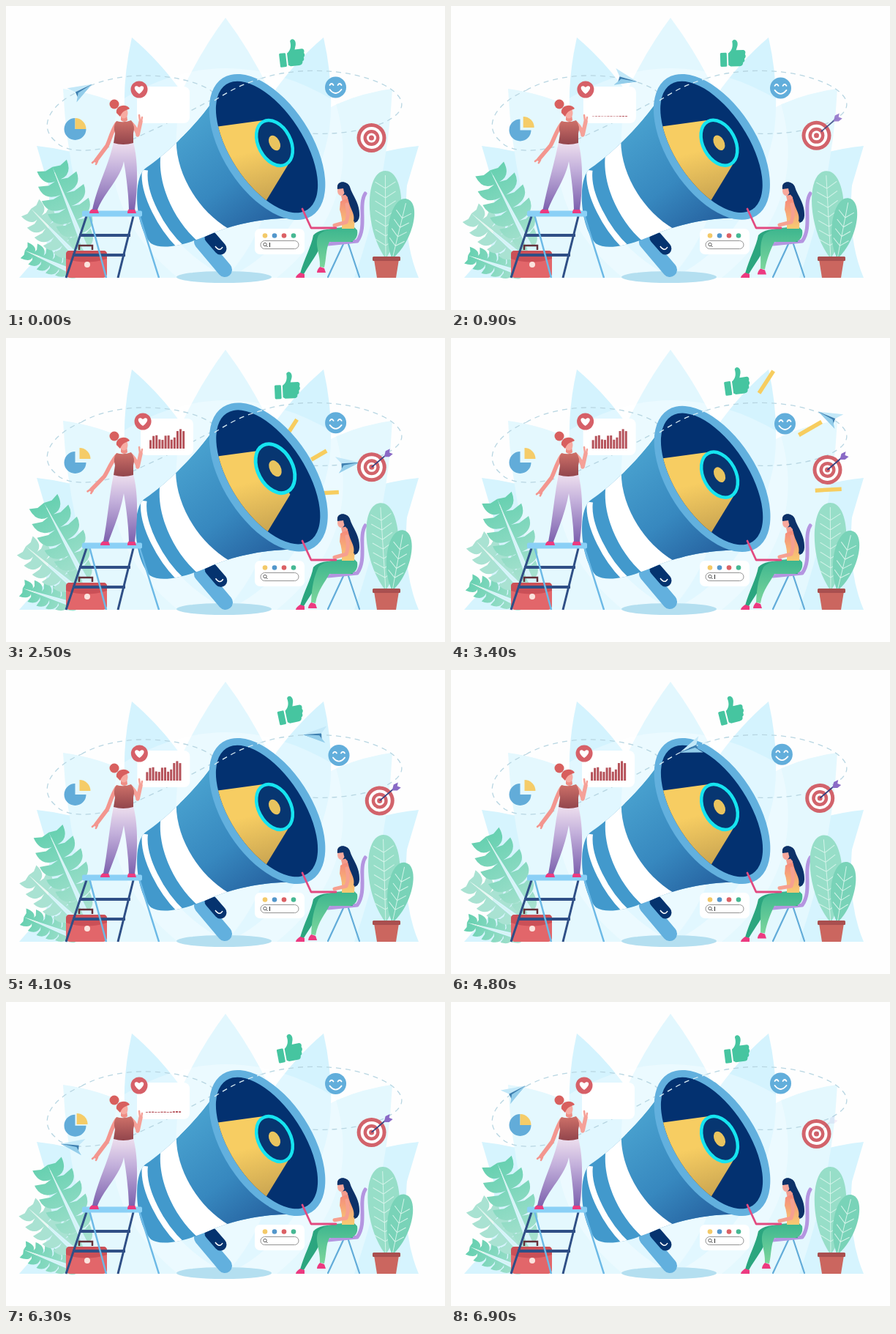
These frames come from a looping animation (600x415 px, 7 s). An HTML page:

```html
<!DOCTYPE html>
<html lang="en">
<head>
<meta charset="utf-8">
<title>Megaphone campaign</title>
<style>
html,body{margin:0;width:100%;height:100%;overflow:hidden;background:#fefefe}
svg{display:block;width:100vw;height:100vh}
</style>
</head>
<body>
<svg viewBox="0 0 600 415" xmlns="http://www.w3.org/2000/svg">
<defs>
  <linearGradient id="cone" x1="0" y1="0" x2=".75" y2="1"><stop offset=".15" stop-color="#4aa3d0"/><stop offset=".6" stop-color="#3788bf"/><stop offset="1" stop-color="#235c9b"/></linearGradient>
  <linearGradient id="gold" x1=".2" y1="0" x2=".45" y2="1"><stop offset=".4" stop-color="#f7cd62"/><stop offset="1" stop-color="#c4a04f"/></linearGradient>
  <linearGradient id="pants" x1="0" y1="0" x2="0" y2="1"><stop offset="0" stop-color="#eedfee"/><stop offset=".4" stop-color="#c3b0db"/><stop offset="1" stop-color="#7d62ae"/></linearGradient>
  <linearGradient id="top" x1="0" y1="0" x2="0" y2="1"><stop offset="0" stop-color="#cf7169"/><stop offset="1" stop-color="#92454c"/></linearGradient>
  <linearGradient id="vest" x1="0" y1="0" x2="0" y2="1"><stop offset="0" stop-color="#f58a7c"/><stop offset="1" stop-color="#f8cb72"/></linearGradient>
  <linearGradient id="jeans" x1="0" y1="0" x2="0" y2="1"><stop offset="0" stop-color="#3bb58e"/><stop offset="1" stop-color="#7cd69c"/></linearGradient>
  <linearGradient id="fern" x1="0" y1="0" x2="0" y2="1"><stop offset="0" stop-color="#66d0b0"/><stop offset="1" stop-color="#a9e2d0"/></linearGradient>
  <clipPath id="mouth"><ellipse cx="356.500" cy="192.500" rx="50" ry="102" transform="rotate(-33 356.500 192.500)"/></clipPath>
  <clipPath id="horn"><path id="hornPath" d="M284 128C258 166 216 205 190 222C173 236 176 300 198 324C215 335 250 324 276 313C310 298 355 288 398 290L350 200Z"/></clipPath>
  <g id="plane">
    <path d="M18 0L-17 -13L-9 -2Z" fill="#c3e8f8"/>
    <path d="M18 0L-9 -2L-10 9Z" fill="#3e7fb0"/>
    <path d="M18 0L-6 1L-15 12Z" fill="#93cdea"/>
  </g>
</defs>

<g id="petals"></g>
<ellipse cx="298" cy="370" rx="65" ry="8" fill="#b4dff0"/>
<g id="ferns"></g>
<path id="route" fill="none" stroke="#b8d6e2" stroke-width="1.300" stroke-dasharray="7 6"/>
<use id="farPlane" href="#plane"/>
<g id="rays" stroke="#f7cd5f" stroke-width="5.500"></g>

<g id="bubble">
  <rect x="179" y="110" width="72" height="50" rx="8" fill="#fff"/>
  <g id="bars" fill="#b5525a"></g>
  <circle cx="182" cy="114" r="11.500" fill="#d66068"/>
  <path d="M182 120C171 112 177 106 182 111C187 106 193 112 182 120Z" fill="#fff"/>
</g>

<g id="mega">
  <path d="M267 322L299 360" stroke="#62b0de" stroke-width="20" stroke-linecap="round"/>
  <path d="M280 316L293 331" stroke="#05336f" stroke-width="17" stroke-linecap="round"/>
  <path d="M286 328q6 8 10 1" fill="none" stroke="#fff" stroke-width="1.500"/>
  <use href="#hornPath" fill="#4299cc"/>
  <g clip-path="url(#horn)">
    <path d="M190 224C186 255 212 305 242 332" fill="none" stroke="#fff" stroke-width="8"/>
    <path d="M213 195C203 235 228 295 267 325L330 310C278 290 233 220 238 165Z" fill="#fff"/>
    <path d="M236 160C222 210 255 275 304 304L420 305L340 120L285 120Z" fill="url(#cone)"/>
  </g>
  <ellipse cx="357" cy="192.500" rx="60.500" ry="112" transform="rotate(-33 357 192.500)" fill="#62b0de"/>
  <ellipse cx="356.500" cy="192.500" rx="50" ry="102" transform="rotate(-33 356.500 192.500)" fill="#033170"/>
  <path clip-path="url(#mouth)" d="M278 166L352 156L386 216L353 270L340 285L265 225Z" fill="url(#gold)"/>
  <g id="core">
    <ellipse cx="367" cy="187" rx="22" ry="33" transform="rotate(-28 367 187)" fill="#073671" stroke="#16e4f0" stroke-width="4.500"/>
    <ellipse cx="367" cy="187" rx="7" ry="11" transform="rotate(-28 367 187)" fill="#e9c45f"/>
  </g>
</g>
<path d="M350 99C325 105 303 117 282 131" fill="none" stroke="#dbeef5" stroke-width="1.300" stroke-dasharray="7 6"/>
<use id="nearPlane" href="#plane"/>

<g id="pie">
  <path d="M0 0V-15A15 15 0 1 0 15 0Z" fill="#62acd9"/>
  <path id="slice" d="M0 0V-15A15 15 0 0 1 15 0Z" fill="#f5cc68"/>
</g>
<g id="thumb" fill="#46c5a0">
  <rect x="-18" y="-1" width="9" height="19" rx="1.500"/>
  <path d="M-7 0C-1 -4 0 -10 -1 -16C1 -21 8 -18 6 -10L4 -4H14Q18 -3 16 2Q18 5 15 8Q16 12 13 13Q13 18 8 18H-4L-7 16Z"/>
</g>
<g id="smile" fill="none" stroke="#fff" stroke-width="1.800" stroke-linecap="round">
  <circle r="14.500" fill="#62aedb" stroke="none"/>
  <path d="M-8 -3q2.500 -4 5 0M3 -3q2.500 -4 5 0M-8 3q8 10 16 0"/>
</g>
<g id="target">
  <circle r="20" fill="#d2636b"/><circle r="15" fill="#fff"/><circle r="11" fill="#d2636b"/><circle r="6.500" fill="#fff"/><circle r="3.500" fill="#d2636b"/>
  <g id="arrow" stroke="#34407f" fill="#8a6ac6"><path d="M0 0L20 -17" stroke-width="1.800"/><path d="M17 -14L19 -22L25 -25L24 -20L29 -18L24 -14Z" stroke="none"/></g>
</g>

<g>
  <rect x="340" y="304" width="68" height="35" rx="7" fill="#fff"/>
  <g id="dots"></g>
  <rect x="348" y="320.500" width="52" height="11" rx="5.500" fill="#fff" stroke="#888" stroke-width=".9"/>
  <path d="M355.500 327l2 2" stroke="#555"/><circle cx="354" cy="325.500" r="2.200" fill="none" stroke="#555" stroke-width=".9"/>
  <path id="caret" d="M360.500 323v6" stroke="#333"/>
</g>

<!-- bag and ladder -->
<path d="M100 333v-6h18v6" fill="none" stroke="#64313a" stroke-width="2.500"/>
<rect x="82" y="334" width="56" height="37" rx="5" fill="#e2666a"/>
<path d="M82 339q0 -5 5 -5h46q5 0 5 5v6q-28 9 -56 0Z" fill="#cb5057"/>
<circle cx="111" cy="353" r="4" fill="#fbe3dd"/>
<g fill="none">
  <path d="M110 287L82 371M174 287L153 371" stroke="#2f4f86" stroke-width="3"/>
  <path d="M100 313H170M91 340H163" stroke="#2f4f86" stroke-width="4"/>
  <path d="M114 285L137 371M182 285L209 371" stroke="#6cb9e6" stroke-width="2.500"/>
</g>
<rect x="104" y="279.500" width="82" height="8" rx="2" fill="#8ad0f6"/>

<!-- standing woman -->
<path d="M171 160C178 167 180 174 180 176L184 158" fill="none" stroke="#f5a198" stroke-width="5.500" stroke-linejoin="round" stroke-linecap="round"/>
<path d="M183 157l-1 -8M185 157l1 -5" stroke="#f5a198" stroke-width="2.500" stroke-linecap="round"/>
<g id="arm"><path d="M151 161C144 172 142 183 138 191L123 211" fill="none" stroke="#f3968f" stroke-width="5.500" stroke-linecap="round" stroke-linejoin="round"/><path d="M124 209l-6 5M125 212l-2 4" stroke="#f3968f" stroke-width="2.500" stroke-linecap="round"/></g>
<path id="shoe" fill="#ec3a80"/>
<path d="M168 277h8l2 6h-12q0 -4 2 -6Z" fill="#ec3a80"/>
<path id="legs" fill="url(#pants)"/>
<path d="M157 147v9q5 4 9 0l-1 -8Z" fill="#ef8f86"/>
<path d="M151 157Q161 160 171 156Q177 164 174 174L174 187Q160 191 147 187L149 174Q146 164 151 157Z" fill="url(#top)"/>
<ellipse cx="161" cy="146" rx="5.500" ry="7.500" fill="#f7aba2"/>
<circle cx="148" cy="134" r="6.500" fill="#d85f5e"/>
<path d="M151 146C149 136 164 132 169 140C165 143 160 141 156 151Z" fill="#d85f5e"/>

<!-- chair and seated woman -->
<g fill="none" stroke-linecap="round">
  <path d="M461 325L440 370M468 325L483 370" stroke="#62acd9" stroke-width="2.200"/>
  <path d="M491 256C481 272 494 302 480 321L440 325" stroke="#b495e0" stroke-width="5" stroke-linejoin="round"/>
</g>
<path d="M453 248C452 238 466 238 470 247C473 258 483 268 483 284Q484 296 472 297C475 288 465 280 462 262Z" fill="#0c3168"/>
<path d="M468 304C445 303 426 305 420 313C417 329 408 344 402 365L407 366C416 350 427 338 432 322L474 322Z" fill="#2ba67f"/>
<path d="M402 364l6 2v5h-12q0 -3 6 -7Z" fill="#ec3a80"/>
<path id="nearLeg" fill="url(#jeans)"/>
<path id="nearShoe" fill="#ec3a80"/>
<path d="M458 259l8 -2l2 9l-8 2Z" fill="#f29a8c"/>
<path d="M457 267Q465 261 472 265Q478 282 476 304L459 304Q460 288 456 278Z" fill="url(#vest)"/>
<path d="M467 258C474 263 485 276 482 289Q480 297 475 294C478 282 468 276 467 258Z" fill="#0c3168"/>
<ellipse cx="458" cy="252" rx="5" ry="7" fill="#f7a89c"/>
<path d="M453 250C451 239 467 237 470 248L469 262Q462 258 461 249Z" fill="#0c3168"/>
<path id="forearm" fill="none" stroke="#f6a090" stroke-width="5" stroke-linecap="round" stroke-linejoin="round"/>
<path d="M405 277L417 303H451" fill="none" stroke="#e24a80" stroke-width="2.800" stroke-linecap="round" stroke-linejoin="round"/>

<g id="plant"></g>
<path d="M503 346H537L533 371H507Z" fill="#cb665f"/><rect x="501" y="342" width="38" height="6" rx="1.500" fill="#a94f4f"/>
</svg>

<script>
const LOOP = 7000, STEP = 100, NS = 'http://www.w3.org/2000/svg';
const $ = id => document.getElementById(id);
const set = (el, attrs) => { for (const a in attrs) el.setAttribute(a, attrs[a]); return el; };
const make = (tag, attrs) => set(document.createElementNS(NS, tag), attrs);
const add = (id, tag, attrs) => (id.appendChild ? id : $(id)).appendChild(make(tag, attrs));
const list = (n, f) => Array.from({length: n}, (_, i) => f(i));
const move = (id, x, y, more = '') => set($(id), {transform: `translate(${x} ${y}) ${more}`});

// motion rules: n swings per loop, eased ramp, on/off span, bell-shaped push
const wave = (t, amp, peak, n = 1) => amp * Math.cos(2 * Math.PI * n * (t - peak) / LOOP);
const ramp = (t, a, b) => { const u = Math.min(1, Math.max(0, (t - a) / (b - a))); return u * u * (3 - 2 * u); };
const span = (t, a, b, c, d) => ramp(t, a, b) - ramp(t, c, d);
const bump = (t, at, before, after) => Math.exp(-(((t - at) / (t < at ? before : after)) ** 2));

// background petals, mirrored about x = 303
function petal(d, fill) {
  add('petals', 'path', {d, fill});
  add('petals', 'path', {d, fill, transform: 'matrix(-1 0 0 1 606 0)'});
}
add('petals', 'path', {d: 'M18 371Q60 320 110 310V371Z', fill: '#d6f4fe'});
petal('M42 191Q90 196 130 212L303 371H42Q64 320 58 245Z', '#d6f4fe');
petal('M78 113Q130 120 170 142L303 371H130Q84 240 78 113Z', '#e4f8fe');
petal('M172 43Q210 75 242 120L303 371Q195 320 164 170Q157 110 172 43Z', '#d4f3fe');
add('petals', 'path', {d: 'M300 16Q333 60 359 113C390 220 350 320 300 371C250 320 215 220 242 113Q267 60 300 16Z', fill: '#e2f7fe'});
add('petals', 'path', {d: 'M155 130C125 230 160 310 235 371H370C445 310 480 230 450 130Q300 40 155 130Z', fill: '#fff', opacity: .3});

// lobed blade pointing up from the origin
function blade(len, w, n) {
  const edge = s => list(n, i => {
    const u = i / n, r = s * w * Math.sin(Math.PI * (.12 + .83 * u)) ** .6, y = -len * u;
    return `${s * 4} ${y}Q${r} ${y} ${r} ${y - len / n * 1.1}L${r * .5} ${y - len / n * .9}`;
  }).join('L');
  return `M${edge(-1)}L0 ${-len}ZM${edge(1)}L0 ${-len}Z`;
}
const ferns = list(3, j => {
  const i = 2 - j, len = 119 - 20 * i, el = add('ferns', 'g', {});
  add(el, 'path', {d: blade(len, 31 - 7 * i, 6), fill: i === 1 ? '#a9e2d2' : 'url(#fern)'});
  add(el, 'path', {d: `M0 0V${8 - len}`, stroke: '#d8f3ea'});
  return {el, x: 108 - 5 * i, y: 330 + 18 * i, lean: -27 - 22 * i, swing: 5};
});
const stems = list(2, i => {
  const len = 120 - 36 * i, w = 20 - 5 * i, el = add('plant', 'g', {});
  const veins = list(Math.floor((len - 28) / 13), k => `M${-w * .7} ${-27 - 13 * k}L0 ${-18 - 13 * k}L${w * .7} ${-27 - 13 * k}`);
  add(el, 'path', {d: `M0 0C${-w * 1.5} ${-len * .35} ${-w * 1.4} ${-len} 0 ${-len}C${w * 1.4} ${-len} ${w * 1.5} ${-len * .35} 0 0Z`, fill: i ? '#79d3b8' : '#97dec8'});
  add(el, 'path', {d: `M0 0V${6 - len}` + veins.join(''), fill: 'none', stroke: '#d3f3e9'});
  return {el, x: 519 + 9 * i, y: 345, lean: 14 * i - 3, swing: 2.7};
});

// flight path in five curves, each ending at its own time
let from = 'M103 115', start = 0;
const legs = [
  [2500, '467 172', 'C155 85 240 92 278 114C335 160 385 182'],
  [3400, '517 108', 'C522 165 572 138'],
  [4800, '328 107', 'C470 84 385 80'],
  [5700, '192 173', 'C280 125 235 155'],
  [7000, '103 115', 'C140 200 85 205 68 185C40 162 66 130']
].map(([end, stop, bend]) => {
  const curve = `${bend} ${stop}`, leg = {start, end, curve, path: make('path', {d: from + curve})};
  from = 'M' + stop;
  start = end;
  return leg;
});
set($('route'), {d: from + legs.map(l => l.curve).join('')});

const bars = list(12, i => ({
  h: 15 + 4 * Math.sin(1.6 * i - 1) + 3 * Math.max(0, i - 7),
  el: add('bars', 'rect', {x: 191 + i * 4.1, width: 3})
}));
['#f3c968', '#5296cb', '#db6064', '#46b893'].forEach((fill, i) =>
  add('dots', 'circle', {cx: 354 + i * 13, cy: 313.5, r: 3.3, fill}));
const rays = list(3, () => add('rays', 'path', {}));

function drawPlane(t) {
  const leg = legs.find(l => t < l.end), len = leg.path.getTotalLength();
  const s = (t - leg.start) / (leg.end - leg.start) * len;
  const at = d => leg.path.getPointAtLength(Math.min(len, Math.max(0, s + d)));
  const p = at(0), a = at(-2), b = at(2), far = t < 3000;
  const angle = Math.atan2(b.y - a.y, b.x - a.x) * 180 / Math.PI;
  const transform = `translate(${p.x} ${p.y}) rotate(${angle}) scale(.92 ${Math.abs(angle) > 90 ? -.92 : .92})`;
  set($('farPlane'), {transform, visibility: far ? 'visible' : 'hidden'});
  set($('nearPlane'), {transform, visibility: far ? 'hidden' : 'visible'});
}

function drawMegaphone(t) {
  const recoil = bump(t, 1700, 600, 450), shout = bump(t, 2500, 300, 500);
  set($('mega'), {transform: `rotate(${-1.1 * recoil} 297 362) translate(260 320) scale(${1 + .02 * shout}) translate(-260 -320)`});
  set($('core'), {transform: `translate(${367 - shout} ${187 - 6 * shout}) scale(${1 + .06 * shout}) translate(-367 -187)`});
  // rays fly straight out from inside the horn
  const u = (t - 2500) / 900, half = Math.max(5, 12 + 6 * u);
  rays.forEach((el, i) => set(el, {
    d: `M${-half} 0H${half}`,
    transform: `translate(329 217) rotate(${27 * i - 57}) translate(${114 + 73 * u} 0)`,
    opacity: span(t, 2000, 2100, 3400, 3900)
  }));
}

function drawIcons(t) {
  const push = bump(t, 3400, 450, 1300);
  move('bubble', 7 * bump(t, 1700, 700, 1400), 0);
  const rise = span(t, 700, 2400, 5300, 6500);
  bars.forEach(b => set(b.el, {y: 151 - b.h * rise, height: b.h * rise}));

  const split = span(t, 200, 1300, 5700, 6700);
  move('pie', 94.5, 168 + 2 * split);
  move('slice', 6 * split, -5 * split);
  move('thumb', 386 + wave(t, 5, 0, 2), 61 + wave(t, 5.5, 1100) + wave(t, 2, 2600, 2), `rotate(${wave(t, 7, 1600) - 7.5})`);
  move('smile', 450.5 + 6 * push, 114 - wave(t, 3, 0));
  move('target', 499.5 + 15 * push, 177 + wave(t, 3, 0, 2));
  const away = 1 - ramp(t, 600, 1000);
  move('arrow', 40 * away, -34 * away);
  set($('arrow'), {opacity: span(t, 600, 1000, 6500, 7000)});
  set($('caret'), {opacity: t % 1400 >= 700 && t % 1400 < 1200 ? 0 : 1});
}

function drawPeople(t) {
  set($('arm'), {transform: `rotate(${12.5 * bump(t, 1700, 700, 1100)} 151 161)`});
  const fx = 118 + 15 * span(t, 300, 1500, 4800, 6200);
  set($('legs'), {d: `M147 186Q160 190 174 186C181 212 180 248 176 278H168C167 250 164 230 161 212C157 235 ${fx + 16} 255 ${fx + 7} 278H${fx}C${fx + 6} 247 141 216 147 186Z`});
  set($('shoe'), {d: `M${fx} 277h7l2 6h-13q0 -4 4 -6Z`});

  const kx = 432 - 12 * span(t, 300, 1500, 4000, 5600), ky = 366 - (kx - 420) / 2.4;
  set($('nearLeg'), {d: `M476 302C458 301 434 304 427 313C421 326 ${kx - 2} 338 ${kx - 3} ${ky - 5}L${kx + 3} ${ky - 4}C${kx + 6} 344 437 332 442 322H470Q482 319 480 306Z`});
  set($('nearShoe'), {d: `M${kx - 3} ${ky - 5}l6 2l2 6h-12q0 -4 4 -8Z`});
  set($('forearm'), {d: `M466 271Q469 285 465 295L449 ${298.5 + wave(t, 1, 0, 14)}`});
}

function draw(t) {
  const sway = wave(t, 1, 0, 2);
  [...ferns, ...stems].forEach(f => set(f.el, {transform: `translate(${f.x} ${f.y}) rotate(${f.lean + f.swing * sway})`}));
  drawPlane(t);
  drawMegaphone(t);
  drawIcons(t);
  drawPeople(t);
}

function frame() {
  draw(Math.floor(performance.now() % LOOP / STEP) * STEP);
  requestAnimationFrame(frame);
}
frame();
</script>
</body>
</html>
```
